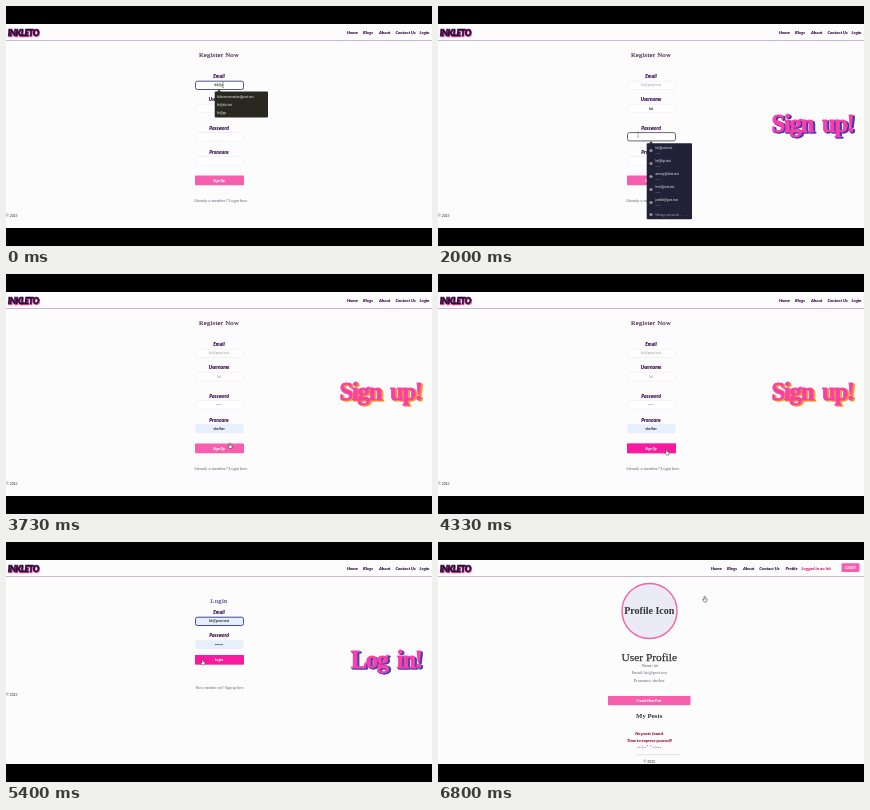
Recreate the animation shown at these times as an HTML page. Size 426x240 px, loop 6870 ms.

```html
<!DOCTYPE html>
<html lang="en">
<head>
<meta charset="utf-8">
<title>Blog sign-up walkthrough</title>
<style>
html, body { margin: 0; width: 100%; height: 100%; overflow: hidden; background: #000; }
svg { display: block; width: 100vw; height: 100vh; }
text { font-family: Lato, "Open Sans", sans-serif; fill: #333; }
.mid { text-anchor: middle; }
.bold { font-weight: 900; font-style: italic; fill: #35094c; }
.nav { font-size: 4.3px; }
.label { font-size: 4.8px; text-anchor: middle; }
.serif { font-family: "Liberation Serif", "Noto Serif", serif; text-anchor: middle; }
.title { font-size: 6.7px; letter-spacing: .26px; fill: #4b2346; stroke: #4b2346; stroke-width: .15px; }
.login-title { fill: #51458c; stroke: #51458c; }
.small { font-size: 4.3px; fill: #645c70; }
.value { font: bold 3.2px "Liberation Sans", sans-serif; text-anchor: middle; fill: #222; }
.btn { fill: #f75fae; }
.hot { fill: #fa1a9f; }
.on-btn { font-size: 3.5px; fill: #fff; text-anchor: middle; }
.field { fill: #fefeff; stroke: #eeebf2; stroke-width: .6; }
.auto { fill: #e6effd; }
.focus { fill: #fff; stroke-width: .9; }
.menu text { font: 2.9px "Liberation Sans", sans-serif; fill: #eee; }
.menu .sub { font-size: 2.3px; fill: #999aa8; }
.menu circle { fill: #90919c; }
.foot { font-size: 3.4px; }
.banner text { font: bold 24.5px "Liberation Serif", serif; letter-spacing: -1.2px; word-spacing: 4px; text-anchor: end; stroke-width: .8px; stroke-linejoin: round; }
.banner .face { fill: #f93fa8; stroke: #f93fa8; }
.logo { font-size: 8.6px; letter-spacing: -.5px; stroke-width: .4px; }
.logo .face { fill: #2b0a3b; stroke: #2b0a3b; }
.logo .back { fill: #e2489f; stroke: #e2489f; }
</style>
</head>
<body>
<svg viewBox="0 0 426 240" preserveAspectRatio="none">
  <defs>
    <linearGradient id="ring"><stop stop-color="#9dbfe6"/><stop offset="1" stop-color="#efc88c"/></linearGradient>
    <clipPath id="page"><rect y="18" width="426" height="204"/></clipPath>
  </defs>
  <rect width="426" height="240"/>
  <g clip-path="url(#page)">
    <rect y="18" width="426" height="204" fill="#fdfcfd"/>
    <rect y="34" width="426" height=".8" fill="#bba9c2"/>
    <g class="logo">
      <text class="bold back" x="2.6" y="30.8">INKLETO</text>
      <text class="bold face" x="1.8" y="30">INKLETO</text>
    </g>
    <g id="nav"></g>

    <g data-on="0 4530">
      <text class="serif title" x="213" y="51.4">Register Now</text>
      <g id="register"></g>
      <rect class="btn" x="189" y="169.5" width="49" height="9.7" rx=".8"/>
      <rect class="btn hot" x="189" y="169.5" width="49" height="9.7" rx=".8" data-on="4000 4530"/>
      <text class="bold on-btn" x="213" y="175.8">Sign Up</text>
      <text class="serif small" x="214.5" y="196.4">Already a member? Login here</text>
      <text class="foot" x="0" y="210.7">© 2023</text>
    </g>

    <g data-on="4530 5870">
      <text class="serif title login-title" x="213" y="60.8">Login</text>
      <g id="login"></g>
      <rect class="btn" x="189" y="113" width="49" height="9.5" rx=".8"/>
      <rect class="btn hot" x="189" y="113" width="49" height="9.5" rx=".8" data-on="5200 5870"/>
      <text class="bold on-btn" x="213" y="119.1">Login</text>
      <text class="serif small" x="213.5" y="147.3" style="font-size:3.7px">Not a member yet? Sign up here</text>
      <text class="foot" x="0" y="153.7">© 2023</text>
    </g>

    <g class="banner" id="banner">
      <text class="shade" x="417.8" y="127.3"></text>
      <text class="shade" x="416.8" y="126.5"></text>
      <text class="face" x="415.8" y="125.5"></text>
    </g>

    <g data-on="5870 6870">
      <circle cx="211.5" cy="69" r="27.5" fill="#ebebf8" stroke="#f463a5" stroke-width="1.4"/>
      <text class="serif" x="211.3" y="72.3" style="font-size:10px;font-weight:bold">Profile Icon</text>
      <text class="serif" x="211.3" y="119" style="font-size:11.4px;stroke:#333;stroke-width:.25">User Profile</text>
      <text class="serif small" x="212" y="125.2">Name: kit</text>
      <text class="serif small" x="211.3" y="132.4">Email: kit@post.test</text>
      <text class="serif small" x="211.3" y="139.6">Pronouns: she/her</text>
      <rect class="btn" x="170" y="154" width="82.5" height="9.3" rx=".8"/>
      <text class="bold on-btn" x="211" y="160">Create New Post</text>
      <text class="serif" x="211.2" y="176.2" style="font-size:6.7px;font-weight:bold">My Posts</text>
      <g style="font-size:4.3px">
        <text class="bold mid" x="211.5" y="193" style="fill:#9c1238">No posts found.</text>
        <text class="bold mid" x="211.5" y="200" style="fill:#9c1238">Time to express yourself!</text>
      </g>
      <text class="mid" x="211.3" y="206.6" style="font:bold 4.5px 'DejaVu Sans',sans-serif;fill:#a3468f">-·✧·˚ ˚·✧·-</text>
      <path d="M198 212.7H243" stroke="#d3ccd8" stroke-width=".6"/>
      <text class="foot mid" x="211.3" y="220.7">© 2023</text>
    </g>

    <g class="menu" id="menus"></g>
    <g id="pointer">
      <path id="beam" d="M-.8-2.5H.8M0-2.5V2.5M-.8 2.5H.8" fill="none" stroke="#666" stroke-width=".5"/>
      <path id="hand" d="M-1-2.5V1L-2 .2L-2.4 1L-.8 3H1.5L2.2 0L.2-.4V-2.5Z" fill="#fff" stroke="#222" stroke-width=".5"/>
    </g>
  </g>
</svg>
<script>
const LOOP = 6870, STEP = 200 / 3;
const USER = "kit", MAIL = "kit@post.test", DOTS = "••••••";
const $ = id => document.getElementById(id);
const add = (id, markup) => $(id).insertAdjacentHTML("beforeend", markup);
const label = (s, y) => `<text class="bold label" x="213" y="${y}">${s}</text>`;
const value = (s, y) => `<text class="value" x="213" y="${y}">${s}</text>`;
const box = (y, cls, more = "") =>
  `<rect class="${cls}" x="189.5" y="${y}" width="48" height="8.3" rx="2" ${more}/>`;

function nav(on, links) {
  const items = links.map(([s, x]) => `<text class="bold nav" x="${x}" y="27.6">${s}</text>`);
  add("nav", `<g data-on="${on}">${items.join("")}</g>`);
}
nav("0 5870", [["Home", 341], ["Blogs", 357], ["About", 373], ["Contact Us", 389.5], ["Login", 413.5]]);
nav("5870 6870", [["Home", 273], ["Blogs", 289], ["About", 305], ["Contact Us", 321.3], ["Profile", 347.5]]);
add("nav", `<g data-on="5870 6870">
  <text class="bold nav" x="363.5" y="27.6" style="fill:#c92a6c">Logged in as: ${USER}</text>
  <rect class="btn" x="403.5" y="21.3" width="18" height="8.8" rx=".8"/>
  <text class="bold on-btn" x="412.5" y="26.7" style="font-size:2.7px">LOGOUT</text></g>`);

// Each field: name, top, focus span, ring colour, typed text, typing span
const fields = [
  ["Email", 75.2, "0 800", "#3c4573", MAIL, [-400, 560]],
  ["Username", 98.4, "800 1670", "url(#ring)", USER, [1200, 1500]],
  ["Password", 126.6, "1670 2870", "#5a565e", DOTS, [1900, 2600]],
  ["Pronouns", 150.6, "2870 3670", "#4d4842", "she/her", [3600, 3660]]
];
const typed = [];
for (const [name, y, on, ring, text, span] of fields) {
  add("register", label(name, y - 3) + box(y, "field") +
    (name === "Pronouns" ? box(y, "auto", 'data-on="3670 4530"') : "") +
    box(y, "focus", `stroke="${ring}" data-on="${on}"`) + value("", y + 5.1));
  typed.push({ el: $("register").lastElementChild, text, span });
}

add("login", label("Email", 72.2) + label("Password", 95.4) +
  box(75.2, "field") + box(98.4, "field") +
  `<g data-on="4870 5870">${box(75.2, "auto", 'stroke="#42489a"')}${box(98.4, "auto")}
  ${value(MAIL, 80.4)}${value(DOTS + "•", 103.6)}</g>`);

function menu(on, fill, y, w, h, body) {
  add("menus", `<g data-on="${on}"><path fill="${fill}" d="M211 ${y + .2}l2-2.2 2 2.2z"/>
    <rect fill="${fill}" x="208.7" y="${y}" width="${w}" height="${h}" rx="1"/>${body}</g>`);
}
const rows = (list, y) => list.map((s, i) => `<text x="211" y="${y + i * 8}">${s}</text>`).join("");
menu("0 530", "#292820", 85.5, 53.3, 26, rows(["kitlanternmeadow@post.test", "kit@dot.test", "kit@pp"], 91.5));
const logins = [MAIL, "kit@kip.test", "wrenny@dots.test", "fern@post.test", "jumble@post.test"];
menu("1670 2470", "#212238", 137.2, 45.3, 76, logins.map((s, i) => {
  const y = 143 + i * 13;
  return `<circle cx="213" cy="${y + 1.5}" r="1.6"/><text x="217.5" y="${y}">${s}</text>
    <text class="sub" x="217.5" y="${y + 4.5}">${DOTS}</text>`;
}).join("") + `<circle cx="213" cy="208.5" r="1.6"/>
  <text class="sub" x="217.5" y="209.5" style="font-size:2.7px">Manage passwords…</text>
  <text class="sub" x="247" y="209.5">›››</text>`);
menu("2930 3600", "#23243c", 161, 34.5, 33.3, rows(["she/her", "he/him", "they/them", "xe"], 167));

const timed = [...document.querySelectorAll("[data-on]")].map(el => [el, ...el.dataset.on.split(" ").map(Number)]);
const path = [[0, 217, 79], [1130, 217, 81], [1600, 200, 128.5], [2500, 200, 128.5], [2900, 227, 157],
  [3200, 227, 157], [3500, 220, 166], [4000, 229, 178], [4530, 229, 178], [5130, 197, 120],
  [5870, 197, 120], [6600, 267, 57], [LOOP, 267, 57]];
const shades = [[0, 110, 95, 185], [1130, 110, 95, 185], [1600, 55, 60, 180], [2200, 55, 60, 180],
  [2900, 243, 155, 45], [4400, 243, 155, 45], [4700, 65, 65, 185], [LOOP, 65, 65, 185]];

function along(keys, t) {
  const i = Math.max(1, keys.findIndex(k => k[0] >= t));
  const a = keys[i - 1], b = keys[i], p = (t - a[0]) / (b[0] - a[0]);
  return a.slice(1).map((v, j) => v + (b[j + 1] - v) * p);
}
const clamp = v => Math.min(1, Math.max(0, v));
const show = (el, on) => { el.style.display = on ? "" : "none"; };
const words = document.querySelectorAll(".banner text");
const shadow = document.querySelectorAll(".shade");

function draw(now) {
  const t = Math.floor(((now % LOOP) + 4) / STEP) * STEP;
  for (const [el, a, b] of timed) show(el, t >= a - 2 && t < b - 2);
  for (const { el, text, span: [a, b] } of typed) {
    el.textContent = text.slice(0, Math.floor(clamp((t - a) / (b - a)) * text.length));
    el.style.fill = t < b + 970 ? "#222" : "#b4b0ba";
  }
  const login = t >= 4530;
  const enter = clamp((t - (login ? 4600 : 200)) / 600);
  for (const el of words) el.textContent = login ? "Log in!" : "Sign up!";
  $("banner").setAttribute("transform", `translate(${100 * (1 - enter) ** 3})`);
  show($("banner"), t < 5868);
  const tint = `rgb(${along(shades, t).map(Math.round)})`;
  for (const el of shadow) el.style.fill = el.style.stroke = tint;
  $("pointer").setAttribute("transform", `translate(${along(path, t)})`);
  show($("beam"), t < 3600);
  show($("hand"), t >= 3600);
}
const start = performance.now();
function tick() {
  draw(performance.now() - start);
  requestAnimationFrame(tick);
}
tick();
</script>
</body>
</html>
```
